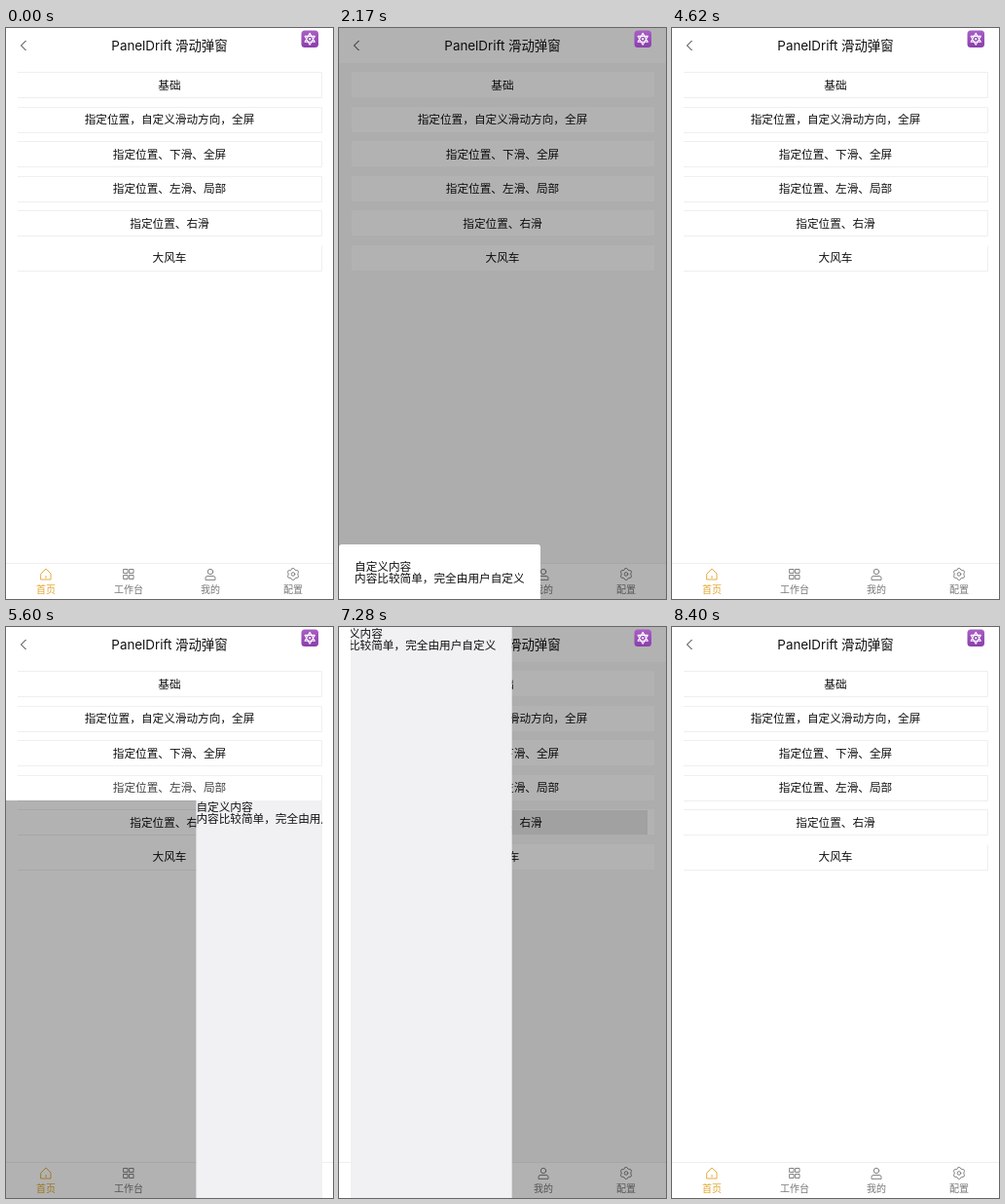
Recreate the animation shown at these times as an HTML page. Size 336 by 586 pixels, loop 8470 ms.

```html
<!DOCTYPE html>
<html lang="zh">
<head>
<meta charset="utf-8">
<style>
  html, body { margin: 0; width: 100%; height: 100%; overflow: hidden; background: #fff; }
  svg { display: block; width: 336px; height: 586px; }
  text { font-family: Inter, "Noto Sans CJK SC", "Noto Sans CJK", sans-serif; font-size: 11.65px; fill: #111; }
  .title { font-size: 13.4px; }
  .tab text { font-size: 10px; fill: #777; }
  .tab path, .tab circle { fill: none; stroke: #777; stroke-width: .9; stroke-linejoin: round; stroke-linecap: round; }
  .tab.active text { fill: #e0a52c; }
  .tab.active path { stroke: #e0a52c; }
  .line { fill: none; stroke: #efefef; }
</style>
</head>
<body>
<svg viewBox="0 0 336 586">
  <defs>
    <clipPath id="clip"><rect id="clipBox"/></clipPath>
    <linearGradient id="purple" x2="0" y2="1">
      <stop stop-color="#a95fc6"/><stop offset="1" stop-color="#8a3fac"/>
    </linearGradient>
  </defs>
  <rect width="336" height="586" fill="#fff"/>
  <rect id="tint" y="36" height="513" fill="#f7f7f7"/>
  <path d="M20.5 13 15.5 18l5 5" fill="none" stroke="#222"/>
  <text class="title" x="168" y="22.7" text-anchor="middle">PanelDrift 滑动弹窗</text>
  <g id="rows"></g>
  <path class="line" d="M0 549.5H336"/>
  <g id="tabs"></g>
  <rect id="mask" fill="#000" fill-opacity=".3"/>
  <g clip-path="url(#clip)">
    <g id="panel">
      <path id="sheet"/>
      <text id="line1">自定义内容</text>
      <text id="line2">内容比较简单，完全由用户自定义</text>
    </g>
  </g>
  <rect x="303.5" y="2.5" width="17.5" height="17.5" rx="3.5" fill="url(#purple)"/>
  <g fill="none" stroke="#fff" stroke-width="1.1" stroke-linejoin="round">
    <path d="M312.2 5.4 317.3 14.2H307.1ZM312.2 17.2 307.1 8.4H317.3Z"/>
    <circle cx="312.2" cy="11.3" r=".6" fill="#fff"/>
  </g>
</svg>
<script>
const LOOP = 8470, DELAY = 15, OPEN_MS = 400, CLOSE_MS = 300, MASK_OFF = 350;
const $ = id => document.getElementById(id);
const set = (el, attrs) => { for (const k in attrs) el.setAttribute(k, attrs[k]); };
const show = (el, on) => set(el, { visibility: on ? 'visible' : 'hidden' });
const clamp = v => Math.min(1, Math.max(0, v));
const easeOut = v => 1 - (1 - clamp(v)) ** 3;

const labels = ['基础', '指定位置，自定义滑动方向，全屏', '指定位置、下滑、全屏',
  '指定位置、左滑、局部', '指定位置、右滑', '大风车'];
$('rows').innerHTML = labels.map((label, i) => {
  const cy = 58.5 + 35.5 * i, top = Math.round(cy - 13.5) + .5, bottom = top + 26;
  const edge = i < 5 ? `M12 ${top}H324.5V${bottom}H12` : `M324.5 ${top}V${bottom}H12`;
  return `<g><rect x="13" y="${top - .5}" width="311" height="26" fill="#fff"/>
    <rect x="13" y="${top + .5}" width="304" height="25" fill="#e6e6e6"/>
    <path class="line" d="${edge}"/>
    <text x="168" y="${cy + 4.4}" text-anchor="middle">${label}</text></g>`;
}).join('');
const rows = [...$('rows').children];

const gear = Array.from({ length: 24 }, (_, k) => {
  const a = (k - .5) * Math.PI / 12, r = k % 4 < 2 ? 6 : 4.9;
  return `${(r * Math.sin(a)).toFixed(1)} ${(-r * Math.cos(a)).toFixed(1)}`;
}).join('L');
const square = (x, y) => `M${x} ${y}h4v4h-4z`;
const tabs = [
  [41, '首页', '<path d="M-5-.5 0-5.5 5-.5V5.5H-5ZM0 2V4"/>'],
  [126, '工作台', `<path d="${square(-5, -5)}${square(1, -5)}${square(-5, 1)}${square(1, 1)}"/>`],
  [210, '我的', '<circle cy="-2.5" r="2.7"/><path d="M-5 5.5V4Q-5 2-3 2H3Q5 2 5 4V5.5Z"/>'],
  [295, '配置', `<path d="M${gear}Z"/><circle r="1.8"/>`]
];
$('tabs').innerHTML = tabs.map(([x, label, icon], i) =>
  `<g class="tab${i ? '' : ' active'}" transform="translate(${x} 560.5)">${icon}
    <text y="19.5" text-anchor="middle">${label}</text></g>`).join('');

// Boxes are [x, y, width, height]; from is the panel's offset while hidden.
const modals = [
  { row: 0, press: 700, open: 910, close: 2170, mask: [0, 0, 336, 586],
    box: [0, 530, 207, 56], from: [0, 56], pad: 16, radius: 3, fill: '#fff', tinted: true },
  { row: 2, press: 3080, open: 3290, close: 4270, mask: [0, 0, 336, 586],
    box: [0, 143, 336, 56], from: [0, -56], pad: 16, radius: 0, fill: '#fff', tinted: true },
  { row: 3, press: 5250, open: 5460, close: 6230, mask: [0, 178, 325, 408],
    box: [134, 178, 191, 408], from: [191, 0], pad: 0, radius: 0, fill: '#f1f0f3' },
  { row: 4, press: 6860, open: 7070, close: 7910, mask: [12, 0, 324, 586],
    box: [12, 0, 191, 586], from: [-191, 0], pad: 0, radius: 0, fill: '#f1f0f3', tinted: true, shade: true }
];

function rowOpacity(m, t) {
  if (t < m.press) return 1;
  return t < m.open ? 1 - .6 * clamp((t - m.press + 40) / 110) : .4 + .6 * clamp((t - m.open - DELAY) / 195);
}

function showModal(m, t) {
  const [mx, my, mw, mh] = m.mask, [x, y, w, h] = m.box, r = m.radius;
  const hidden = t < m.close
    ? 1 - easeOut((t - m.open - DELAY) / OPEN_MS)
    : easeOut((t - m.close - DELAY) / CLOSE_MS);
  set($('mask'), { x: mx, y: my, width: mw, height: mh });
  set($('tint'), { x: mx, width: m.tinted ? mw : 0 });
  const clipTop = m.from[1] < 0 ? y : my;
  set($('clipBox'), { x: mx, y: clipTop, width: mw, height: my + mh - clipTop });
  set($('panel'), { transform: `translate(${m.from[0] * hidden} ${m.from[1] * hidden})` });
  set($('sheet'), { fill: m.fill, d: `M${x} ${y + h}V${y + r}q0 ${-r} ${r} ${-r}H${x + w - r}q${r} 0 ${r} ${r}V${y + h}Z` });
  set($('line1'), { x: x + m.pad, y: y + m.pad + 10.5 });
  set($('line2'), { x: x + m.pad, y: y + m.pad + 22.5 });
}

function draw(now) {
  const t = now % LOOP;
  const active = modals.find(m => t >= m.open && t < m.close + MASK_OFF);
  rows.forEach((row, i) => {
    const m = modals.find(m => m.row === i);
    const [, shade, edge, text] = row.children;
    set(text, { opacity: m ? rowOpacity(m, t) : 1 });
    show(edge, !(active && active.tinted));
    show(shade, m && m.shade && active === m && t < m.open + 280);
  });
  for (const id of ['mask', 'tint', 'panel']) show($(id), active);
  if (active) showModal(active, t);
}

const start = performance.now();
function tick() {
  draw(performance.now() - start);
  requestAnimationFrame(tick);
}
tick();
</script>
</body>
</html>
```
